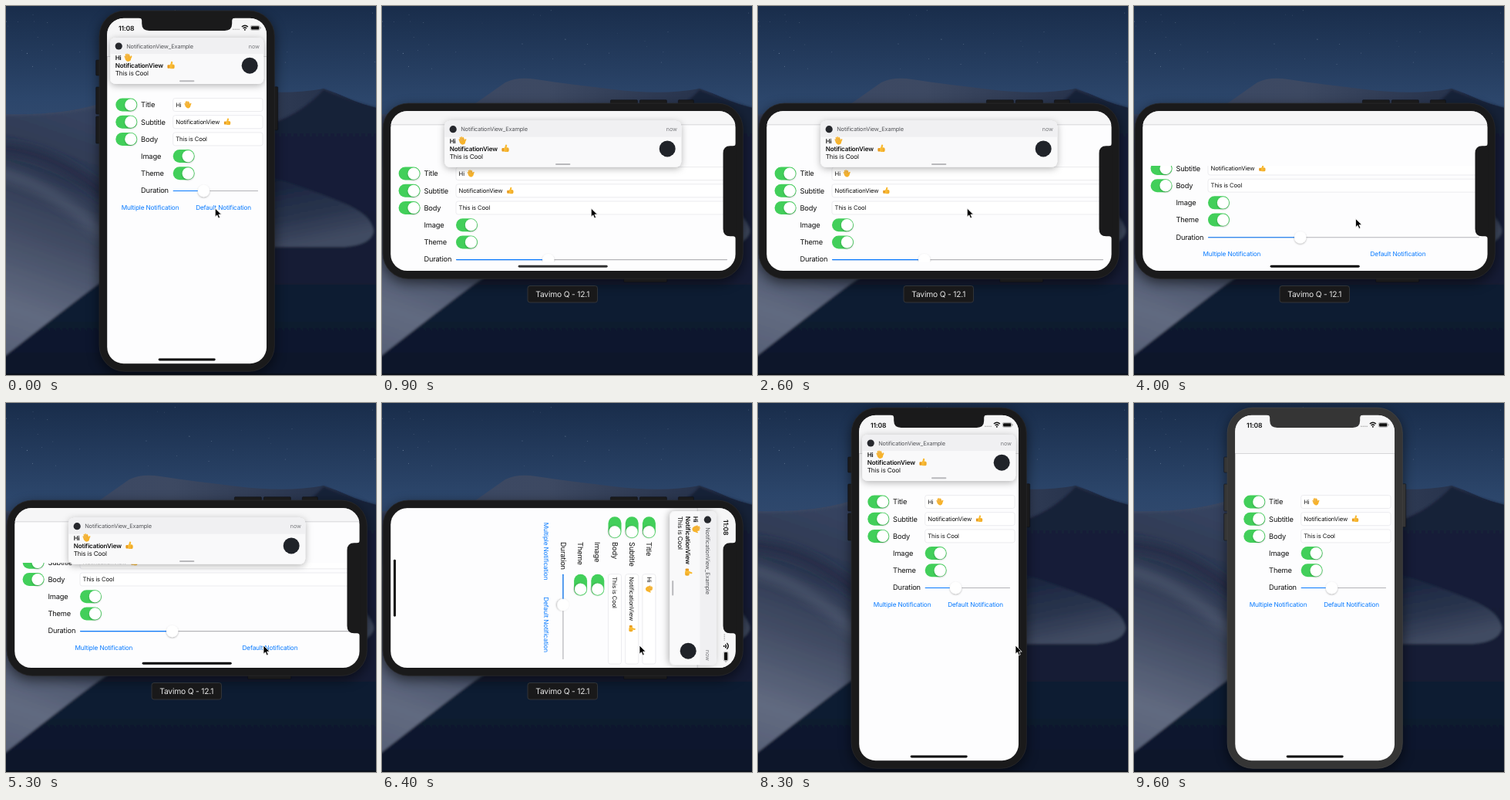
An HTML page for the animation above (9700 ms loop, 480 by 478 pixels).

```html
<!DOCTYPE html>
<html lang="en">
<head>
<meta charset="utf-8">
<title>Notification demo</title>
<style>
  html, body { margin: 0; width: 100%; height: 100%; overflow: hidden; background: #101a2e; }
  svg { display: block; width: 480px; height: 478px; }
  text { font-family: Inter, "Liberation Sans", sans-serif; letter-spacing: -.02em; text-rendering: geometricPrecision; }
</style>
</head>
<body>
<svg viewBox="0 0 480 478" xmlns="http://www.w3.org/2000/svg">
  <defs>
    <linearGradient id="sky" x1="0" y1="0" x2="0" y2="1">
      <stop offset="0" stop-color="#192d4b"/><stop offset=".5" stop-color="#2c466b"/><stop offset="1" stop-color="#3d5274"/>
    </linearGradient>
    <linearGradient id="ridge" x1="0" y1="0" x2="1" y2="0">
      <stop offset="0" stop-color="#3a4763"/><stop offset=".45" stop-color="#3d4962"/>
      <stop offset=".85" stop-color="#28344d"/><stop offset="1" stop-color="#101c36"/>
    </linearGradient>
    <linearGradient id="face" x1=".25" y1="0" x2="0" y2="1">
      <stop offset="0" stop-color="#35425e"/><stop offset=".25" stop-color="#2c3750"/>
      <stop offset=".5" stop-color="#424c64"/><stop offset=".8" stop-color="#616a80"/><stop offset="1" stop-color="#565f76"/>
    </linearGradient>
    <linearGradient id="lens" x1="0" y1="0" x2=".3" y2="1">
      <stop offset="0" stop-color="#17223c"/><stop offset=".6" stop-color="#2a354e"/><stop offset="1" stop-color="#414b62"/>
    </linearGradient>
    <linearGradient id="low" x1="0" y1="0" x2="0" y2="1">
      <stop offset="0" stop-color="#152039"/><stop offset=".6" stop-color="#121d35"/><stop offset="1" stop-color="#0d1629"/>
    </linearGradient>
    <clipPath id="screen"><rect x="-103.6" y="-223.9" width="207" height="447.4" rx="21.5"/></clipPath>
    <filter id="soft" x="-20%" y="-20%" width="140%" height="140%"><feGaussianBlur stdDeviation="8"/></filter>
    <filter id="haze" x="-20%" y="-20%" width="140%" height="140%"><feGaussianBlur stdDeviation="1.4"/></filter>
    <filter id="fold" x="-30%" y="-60%" width="160%" height="220%"><feGaussianBlur stdDeviation="6"/></filter>
    <filter id="lift" x="-50%" y="-50%" width="200%" height="200%">
      <feDropShadow dx="0" dy="1" stdDeviation="1.2" flood-opacity=".3"/>
    </filter>
    <filter id="float" x="-20%" y="-40%" width="140%" height="190%">
      <feDropShadow dx="0" dy="2" stdDeviation="5" flood-opacity=".3"/>
    </filter>
  </defs>
  <rect width="480" height="240" fill="url(#sky)"/>
  <g id="stars" fill="#b9c8dc"></g>
  <path d="M0 140Q70 142 120 127L160 99Q176 91 200 95T300 108Q365 116 412 107Q430 113 445 120T480 132V478H0Z" fill="url(#ridge)"/>
  <g filter="url(#haze)">
    <path d="M412 108Q440 122 490 134V490H-10V300H230L345 152Q385 138 412 108Z" fill="url(#low)"/>
    <path d="M-5 142Q70 144 125 130L230 310Q150 338 120 360T-5 456Z" fill="url(#face)"/>
    <path d="M345 222Q395 238 435 254T477 292Q474 309 440 312H345Z" fill="url(#lens)"/>
  </g>
  <g filter="url(#fold)" fill="none" stroke-width="16">
    <path d="M-10 184Q60 186 130 246" stroke="#212b44" opacity=".7"/>
    <path d="M-10 216Q60 232 130 300" stroke="#5c657c" opacity=".45"/>
  </g>
  <rect y="476" width="480" height="2" fill="#0a101b"/>
  <g id="stage"></g>
</svg>
<script>
const LOOP = 9700, STEP = 100;
const CX = 234.7, CY = 239.7;
const BLUE = '#087aff', INK = '#111';

// Times at which the handset flips between upright and sideways.
const FLIPS = [270, 1170, 2130, 5400, 6370, 7100];
const DELAY = 70, TURN = 400, FADE = 200;

const stage = document.getElementById('stage');
const mix = (a, b, k) => a + (b - a) * k;
const ramp = (t, from, to) => Math.min(1, Math.max(0, (t - from) / (to - from)));
const smooth = k => k * k * (3 - 2 * k);
const ease = (t, from, to) => smooth(ramp(t, from, to));

function text(x, y, size, str, { fill = INK, weight = 400, anchor = 'start' } = {}) {
  return `<text x="${x}" y="${y + size * .364}" font-size="${size}" font-weight="${weight}" fill="${fill}" text-anchor="${anchor}">${str}</text>`;
}

function box(x, y, w, h, r, fill, more = '') {
  return `<rect x="${x}" y="${y}" width="${w}" height="${h}" rx="${r}" fill="${fill}" ${more}/>`;
}

function hand(x, y, size) {
  return `<g transform="translate(${x} ${y}) rotate(-22) scale(${size / 9})" stroke="#f7b32b" stroke-linecap="round" fill="none">
    <path d="M-2.3 .6V-2.6M-.6 0V-4.2M1.1 0V-4.2M2.7 .6V-3" stroke-width="1.4"/>
    <path d="M2.2 2.6 4.6 .2" stroke-width="1.6"/>
    <path d="M-3 0H3.4V1.6Q3 4.6 .3 4.6T-3 1.6Z" fill="#f7b32b" stroke="none"/>
    <path d="M-1.4-.2V-2.2M.25-.4V-3.2M1.9-.2V-2.4" stroke="#d98a1c" stroke-width=".35"/></g>`;
}

function thumb(x, y, size) {
  return `<g transform="translate(${x} ${y}) scale(${size / 9})">
    ${box(-4.3, -.4, 3, 4, 1, '#e79a1f')}${box(-1.9, -1.1, 5.9, 5.2, 1.7, '#f9bb34')}
    <path d="M-.4 0Q.6-1.6 .8-3.4" stroke="#f9bb34" stroke-width="2.1" stroke-linecap="round" fill="none"/>
    <path d="M1.4 .4H3.6M1.4 1.7H3.7M1.4 3H3.4" stroke="#d98a1c" stroke-width=".4"/></g>`;
}

function toggle(x, y) {
  return box(x, y - 8.5, 28, 17, 8.5, '#42cf5a') +
    `<circle cx="${x + 19.5}" cy="${y}" r="7.6" fill="#fff" filter="url(#lift)"/>`;
}

function statusBar(alpha) {
  const dots = [0, 1, 2, 3].map(i => `<circle cx="${163.8 + i * 2.4}" cy="14.8" r=".7" fill="#999"/>`).join('');
  return `<g opacity="${alpha}">${text(15, 13, 8.6, '11:08', { weight: 600 })}${dots}
    <g fill="none" stroke="${INK}" stroke-width="1.4">
      <path d="M174.8 11.6Q178.8 8 182.8 11.6M176.5 13.6Q178.8 11.6 181.1 13.6"/></g>
    <circle cx="178.8" cy="15.3" r="1" fill="${INK}"/>
    ${box(186.2, 10, 11.8, 5.8, 1.6, 'none', 'stroke="#888" stroke-width=".6"')}
    ${box(187, 10.8, 10.2, 4.2, 1, INK)}${box(198.7, 11.9, .8, 2, .4, '#888')}</g>`;
}

// k runs from the upright layout (0) to the sideways one (1).
function form(k, w, h, scroll) {
  const top = mix(112.6, 81, k), left = 11.2, label = 44, field = 85.6;
  const right = mix(202, 437.6, k), trackEnd = mix(196, 437.6, k);
  const knob = mix(125.4, 205.3, k);
  const rows = ['Title', 'Subtitle', 'Body', 'Image', 'Theme', 'Duration'];
  const values = ['Hi', 'NotificationView', 'This is Cool'];
  let out = '';
  rows.forEach((name, i) => {
    const y = top + i * 22.2;
    out += text(label, y, 9.3, name);
    if (i < 3) {
      out += toggle(left, y);
      out += box(field, y - 8.5, right - field, 17, 2.8, '#fff', 'stroke="#e4e4e8" stroke-width=".7"');
      out += text(field + 3.6, y, 7.7, values[i]);
      if (i === 0) out += hand(field + 18.6, y, 9);
      if (i === 1) out += thumb(field + 70.5, y - .2, 9);
    } else if (i < 5) out += toggle(field, y);
  });
  const y = top + 111.5;
  out += box(field, y - .6, trackEnd - field, 1.2, .6, '#b4b4b8') + box(field, y - .6, knob - field, 1.2, .6, BLUE) +
    `<circle cx="${knob}" cy="${y}" r="7.7" fill="#fff" filter="url(#lift)"/>`;
  const link = { fill: BLUE, anchor: 'middle' };
  out += text(mix(55.9, 116.5, k), top + 133, 8.25, 'Multiple Notification', link) +
    text(mix(151, 332, k), top + 133, 8.25, 'Default Notification', link);
  const clipTop = top - 10, clipEnd = h - 12 * k;
  return `<clipPath id="list"><rect x="0" y="${clipTop}" width="${w}" height="${clipEnd - clipTop}"/></clipPath>
    <g clip-path="url(#list)"><g transform="translate(0 ${-scroll})">${out}</g></g>`;
}

// The banner takes its new size at once and stays centred while the rest turns.
function banner(viewWidth, wide, shown) {
  if (shown <= 0) return '';
  const w = wide ? 307 : 199, x = (viewWidth - w) / 2, y = (wide ? 12.6 : 25.6) - (1 - shown) * 110;
  return `<g transform="translate(${x} ${y})">
    <g filter="url(#float)">${box(0, 0, w, 60, 7, '#f9f9fa')}</g>
    <path d="M0 21V7Q0 0 7 0H${w - 7}Q${w} 0 ${w} 7V21Z" fill="#f0f0f2"/>
    <circle cx="11" cy="11" r="4.6" fill="#26282d"/>
    ${text(21, 11, 7.4, 'NotificationView_Example', { fill: '#55565a' })}
    ${text(w - 5.5, 11, 7.2, 'now', { fill: '#77787c', anchor: 'end' })}
    ${text(6.5, 26, 8.1, 'Hi', { weight: 600 })}${hand(22.5, 26, 10)}
    ${text(6.5, 36, 8.1, 'NotificationView', { weight: 600 })}${thumb(79, 35.8, 10)}
    ${text(6.5, 46, 8.2, 'This is Cool')}
    <circle cx="${w - 18}" cy="36.2" r="10.5" fill="#202329"/>
    ${box(w / 2 - 9.7, 55.2, 19.4, 2, 1, '#b9b9bc')}</g>`;
}

function content(s) {
  const k = s.layout;
  const w = mix(207.2, 448.6, k), h = mix(448.6, 207.2, k), nav = mix(49.6, 17.5, k);
  const bar = mix(74, 116, k);
  return `<g transform="rotate(${-90 * k}) translate(${-w / 2} ${-h / 2})">
    ${box(0, 0, w, h, 0, '#fdfdfe')}
    ${box(0, 0, w, nav, 0, '#f6f6f7')}${box(0, nav, w, .6, 0, '#bcbcc0')}
    ${form(k, w, h, s.scroll * k)}
    ${statusBar(Math.max(0, 1 - k * 8))}
    ${banner(w, s.wide, s.banner)}
    ${box((w - bar) / 2, h - 7.5, bar, 2.9, 1.45, '#000', `opacity="${s.home}"`)}</g>`;
}

function handset(s) {
  const shell = s.dim ? '#353535' : '#1a1a1b';
  const edge = s.dim ? '#444' : '#29292b';
  const keys = [[-118, -169.7, 20], [-118, -134.7, 35], [-118, -96.7, 35], [113, -135, 56]]
    .map(([x, y, len]) => box(x, y, 5, len, 1, shell, 'stroke="#0b0d12" stroke-width=".5"')).join('');
  const shadow = 'opacity=".55" filter="url(#soft)"';
  return `<g transform="translate(${CX} ${CY})">
    ${s.side ? box(-234, -109, 468, 228, 33, '#000', shadow) : box(-114, -229, 228, 468, 33, '#000', shadow)}
    <g transform="rotate(${s.side * 90})">${keys}
      ${box(-113.6, -233.6, 227.2, 467.2, 33, shell, `stroke="${edge}" stroke-width=".8"`)}
      <g clip-path="url(#screen)">${box(-104, -225, 208, 450, 0, '#000')}${content(s)}</g>
      <path d="M-62-226V-224.3Q-58.5-224.3-58.5-220.5V-217Q-58.5-207.8-49-207.8H49Q58.5-207.8 58.5-217V-220.5Q58.5-224.3 62-224.3V-226Z" fill="${shell}"/>
    </g></g>`;
}

function caption() {
  return box(189, 362.5, 90.5, 21.5, 3, '#19191a', 'stroke="#3a3b3e" stroke-width=".8"') +
    text(234.2, 373.3, 10.3, 'Tavimo Q - 12.1', { fill: '#e6e6e6', anchor: 'middle' });
}

function pointer(t) {
  if (t >= 9000) return '';
  const go = ease(t, 3800, 4400), leave = ease(t, 8400, 9000);
  const x = mix(mix(271.3, 334, go), 462, leave), y = mix(mix(262, 314, go), 4, leave);
  return `<path transform="translate(${x} ${y})" d="M0 0V11.2L2.6 8.8 4.3 12.9 6.3 12 4.6 8.1H8.2Z" fill="#000" stroke="#fff" stroke-width=".8"/>`;
}

function stateAt(t) {
  const done = FLIPS.filter(f => t >= f);
  const side = done.length % 2;
  const last = done.length ? done[done.length - 1] : -9999;
  const start = last + DELAY, end = start + TURN;
  const turn = ease(t, start, end);
  return {
    side,
    wide: t > start ? side : 1 - side,
    layout: side ? turn : 1 - turn,
    home: t <= start ? 1 : ramp(t, end, end + FADE),
    scroll: t < 6000 ? 33 * ease(t, 3300, 4200) : 0,
    banner: t < 4200 ? 1 - ease(t, 2900, 3400) : ease(t, 4400, 4900) - ease(t, 8500, 9000),
    dim: t >= 9200
  };
}

function draw(t) {
  const s = stateAt(t);
  stage.innerHTML = handset(s) + (s.side ? caption() : '') + pointer(t);
}

function scatterStars() {
  let seed = 17, out = '';
  const rnd = () => (seed = seed * 16807 % 2147483647) / 2147483647;
  for (let i = 0; i < 36; i++)
    out += `<circle cx="${rnd() * 480}" cy="${rnd() * 85}" r="${.3 + rnd() * .3}" opacity="${.2 + rnd() * .5}"/>`;
  document.getElementById('stars').innerHTML = out;
}

scatterStars();
const began = performance.now();
let shown = -1;
function tick() {
  const t = Math.floor((performance.now() - began) % LOOP / STEP) * STEP;
  if (t !== shown) draw(shown = t);
  requestAnimationFrame(tick);
}
tick();
</script>
</body>
</html>
```
